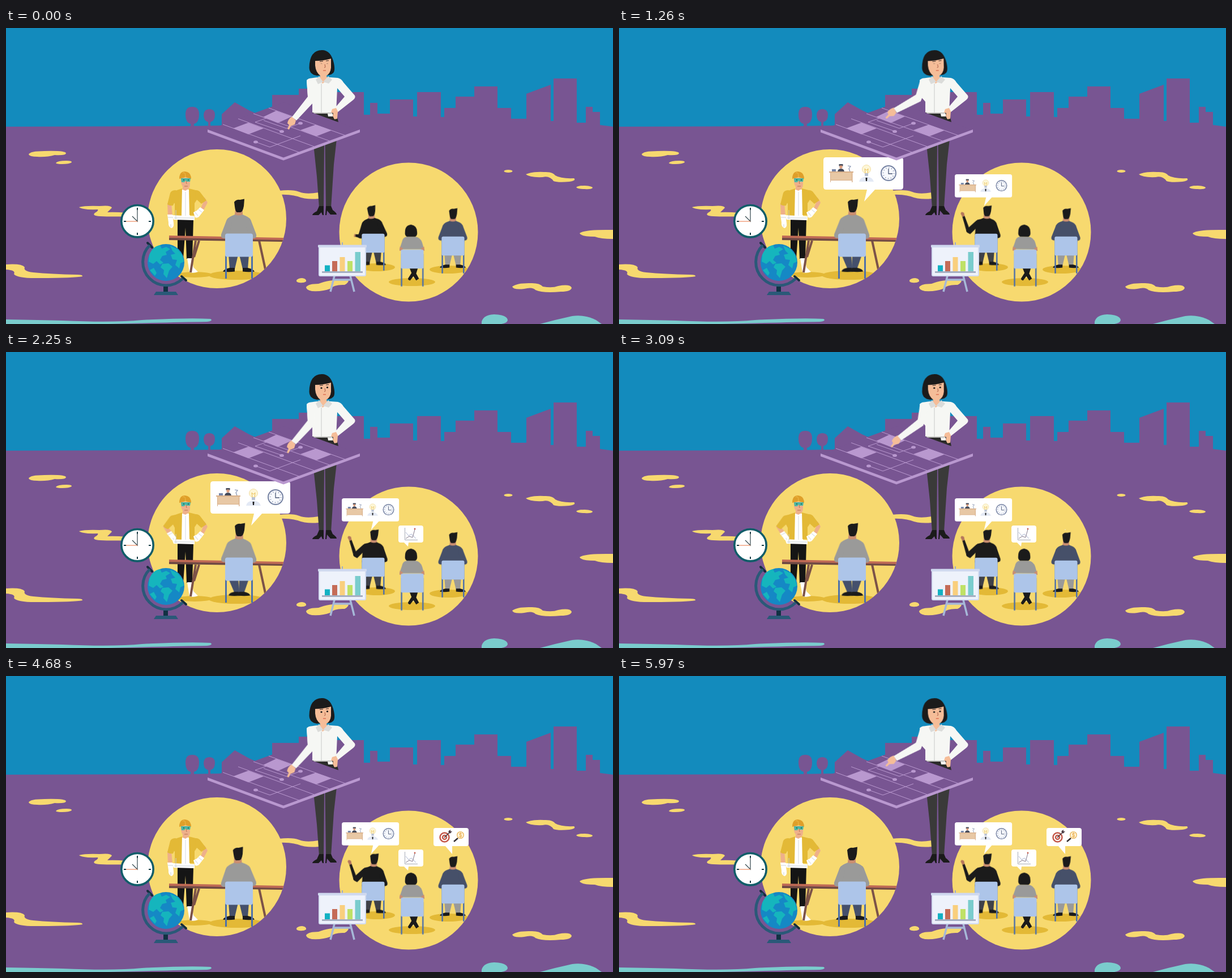
These frames come from a looping animation (1072x522 px, 6 s). An HTML page:

```html
<!DOCTYPE html>
<html lang="en">
<head>
<meta charset="utf-8">
<title>Planning workshop</title>
<style>
html, body { margin: 0; width: 100%; height: 100%; overflow: hidden; background: #785592; }
svg { display: block; width: 100%; height: 100%; }
.ground { fill: #785592; }
.sun { fill: #f7d96f; }
.shade { fill: #e3b936; }
.teal { fill: #7acccd; }
.skin { fill: #f5bd98; }
.ink { fill: #1b1b1b; }
.white { fill: #fff; }
.coat { fill: var(--coat); }
.leg { fill: var(--pants); }
.wire { fill: none; stroke: #b998cf; stroke-width: 1; }
.patch { fill: #b998cf; }

[class*="a-"] { animation: 6s infinite cubic-bezier(.37, 0, .63, 1); }
.a-point { animation-name: point; transform-origin: 538px 96px; }
.a-nod { animation-name: nod; transform-origin: 561px 90px; }
.a-blink { animation-name: blink; animation-timing-function: step-end; transform-origin: 562px 63px; }
.a-wink { animation-name: wink; animation-timing-function: step-end; transform-origin: 318px 268px; }
.a-upper { animation-name: upper; transform-origin: 292px 290px; }
.a-fore { animation-name: fore; transform-origin: 287px 311px; }
.a-lean { animation-name: lean; transform-origin: 411px 372px; }
.a-footL { animation-name: footL; transform-origin: 402px 400px; }
.a-footR { animation-name: footR; transform-origin: 420px 400px; }
.a-turn { animation-name: turn; transform-origin: 411px 372px; }
.a-raise { animation-name: raise; transform-origin: 398px 336px; }
.a-wave { animation-name: wave; transform-origin: 383px 367px; }
.a-sway { animation-name: sway; transform-origin: 411px 372px; }
.a-talk1 { animation-name: talk1; transform-origin: 433px 306px; }
.a-talk2 { animation-name: talk2; transform-origin: 433px 306px; }
.a-talk3 { animation-name: talk3; transform-origin: 710px 343px; }
.a-talk4 { animation-name: talk4; transform-origin: 788px 314px; }

@keyframes point { 0%, 40%, 80% { transform: rotate(0deg); } 20%, 60%, 100% { transform: rotate(21deg); } }
@keyframes nod { 0%, 40%, 80% { transform: rotate(0deg); } 20%, 60%, 100% { transform: rotate(-1deg); } }
@keyframes blink {
  0%, 20%, 40%, 60%, 80% { transform: scaleY(.2); }
  2.3%, 22.3%, 42.3%, 62.3%, 82.3%, 100% { transform: none; }
}
@keyframes wink { 0%, 7.5%, 90.5%, 100% { transform: none; } 5%, 88% { transform: scaleY(.2); } }
@keyframes upper { 0%, 29%, 65%, 100% { transform: rotate(0deg); } 36.5%, 54% { transform: rotate(22deg); } }
@keyframes fore {
  0%, 29%, 65%, 100% { transform: rotate(0deg) scaleY(1); }
  36.5%, 54% { transform: rotate(-50deg) scaleY(.72); }
}
@keyframes lean {
  0%, 100% { transform: rotate(0deg); }
  9%, 63% { transform: rotate(1deg); }
  76%, 82% { transform: rotate(-2deg); }
}
@keyframes footL { 0%, 75%, 100% { transform: skewX(0deg); } 9%, 65% { transform: skewX(19deg); } }
@keyframes footR { 0%, 75%, 100% { transform: skewX(0deg); } 9%, 65% { transform: skewX(-15deg); } }
@keyframes turn { 0% { transform: rotate(-4deg); } 8%, 100% { transform: rotate(2deg); } }
@keyframes raise { 0% { transform: rotate(0deg); } 8%, 100% { transform: rotate(25deg); } }
@keyframes wave { 0% { transform: rotate(-80deg) scaleY(.3); } 8%, 100% { transform: rotate(-46deg); } }
@keyframes sway { 0%, 40%, 80% { transform: none; } 20%, 60%, 100% { transform: rotate(.8deg); } }
@keyframes talk1 { 0%, 14%, 50%, 100% { transform: scale(0); } 19%, 45% { transform: none; } }
@keyframes talk2 { 0%, 7% { transform: scale(0); } 12%, 100% { transform: none; } }
@keyframes talk3 { 0%, 26% { transform: scale(0); } 31%, 100% { transform: none; } }
@keyframes talk4 { 0%, 51% { transform: scale(0); } 56%, 100% { transform: none; } }
</style>
</head>
<body>
<svg viewBox="0 0 1072 522" preserveAspectRatio="none">
<defs>
  <clipPath id="room"><circle cx="372.5" cy="336.5" r="122.5"/></clipPath>
  <clipPath id="hall"><circle cx="711" cy="360" r="122.5"/></clipPath>

  <g id="chair">
    <path d="M388.500 372V442M434.500 372V442" stroke="#4c70ab" stroke-width="3"/>
    <rect x="387" y="362.500" width="49" height="41" rx="3.5" fill="#adc5e9"/>
  </g>
  <g id="trunk">
    <path class="coat" d="M391 338Q394 333 404 329H418Q428 333 431 338L434 346L436 374H387L388 346z"/>
    <path fill="#c98d70" d="M405 318H418V329Q411 332 404 329z"/>
    <path class="ink" d="M403 307Q407 302 413 303L421 301.500L420 314Q418 325 414 325H408Q405 324 404 315z"/>
  </g>
  <path id="sleeve" class="coat" d="M400 331Q390 334 388 343L380 364Q379 370 384 371H391L398 350z"/>
  <path id="shin" class="leg" d="M393 400H410L404 425H395z"/>
  <path id="shoe" class="ink" d="M404 423V429.500Q393 431 383 429.500Q385 425 395 423z"/>
  <g id="legs">
    <use href="#shin"/><use href="#shoe"/>
    <g transform="matrix(-1 0 0 1 822 0)"><use href="#shin"/><use href="#shoe"/></g>
  </g>

  <g id="agenda">
    <path class="white" d="M366 228H497Q502 228 502 233V280Q502 285 497 285H452L433 306L438 285H366Q361 285 361 280V233Q361 228 366 228z"/>
    <path fill="#d9b08a" d="M371 253H414V255H412.500V272H411V269H374V272H373V255H371z"/>
    <path fill="#e8c8a5" d="M374 255H411V268H374z"/>
    <path fill="#464b5a" d="M386 253Q387 248 392 248Q397 248 398 253zM388.500 240H395.500V243.500H388.500z"/>
    <circle cx="392" cy="245" r="2.700" fill="#dc9c7c"/>
    <path fill="#7887a8" d="M376 249H383V253H376z"/>
    <path d="M408 253L406 248L409 244L404 243" fill="none" stroke="#8290ae" stroke-width="1.200"/>
    <path fill="#e3e9f5" d="M424 271Q425 263 437 262Q448 263 450 271z"/>
    <path class="ink" d="M435.500 264H438.500L438 270H436z"/>
    <circle cx="437" cy="249" r="7.500" fill="#fdf6d6" stroke="#f3dfa5"/>
    <path d="M435 256L434 248L437 251L440 248L439 256" fill="none" stroke="#eabf58"/>
    <path fill="#b9c2d3" d="M434 256H440V261H434z"/>
    <circle cx="476" cy="256" r="13" fill="#f7f9fd" stroke="#7582a2" stroke-width="2"/>
    <circle cx="476" cy="256" r="9.500" fill="none" stroke="#7582a2" stroke-width="2" stroke-dasharray="1 3.974"/>
    <path d="M476 248V257H483" fill="none" stroke="#4c5875" stroke-width="1.300"/>
  </g>
</defs>

<rect width="1072" height="522" fill="#138bbd"/>
<g class="ground">
  <path d="M0 174L318 173L381 172V152L404 131L429 145L440 150L470 139V118H517V107H531L560 113H632V153H643V132H656V151H678V126H719V156H726V113H768V157H774V141H794V121H827V103H868V141H892V160H919V116L962 100V164H967V89H1008V167H1024V139H1036V148H1049V171L1072 174V522H0z"/>
  <path d="M317 152Q317 139 329 139Q341 139 341 152Q341 167 332 169V174H326V169Q317 167 317 152zM349 153Q350 143 359 143Q369 143 369 153Q369 164 361 166V174H357V166Q349 164 349 153z"/>
</g>

<g class="sun">
  <path d="M40 223Q42 217 68 217Q106 216 106 221Q105 225 86 224Q72 228 55 227Q42 227 40 223z"/>
  <path d="M88 238Q91 234 107 234Q117 234 116 237Q112 240 99 240Q89 240 88 238z"/>
  <path d="M129 316Q140 313 165 314Q186 312 187 317Q183 321 179 325Q190 324 215 326V332Q190 333 166 332Q151 331 157 326Q164 322 162 320Q135 321 129 316z"/>
  <path d="M0 417Q28 415 33 422Q30 429 48 431Q80 434 126 435Q136 435 135 438Q120 441 60 441Q20 442 14 434Q18 427 0 426z"/>
  <path d="M482 287Q505 284 518 289Q530 294 552 290V301Q530 303 515 297Q500 293 482 294z"/>
  <ellipse cx="887" cy="252.500" rx="7.500" ry="2.500"/>
  <path d="M918 258Q930 253 950 254Q965 253 970 260Q980 266 1003 265Q1008 269 995 271Q975 273 967 270Q960 260 948 263Q925 264 918 258z"/>
  <path d="M1007 281Q1010 278 1022 278Q1037 279 1036 282Q1033 285 1022 284Q1009 284 1007 281z"/>
  <path d="M1072 356Q1020 355 1013 362Q1016 368 1040 368Q1050 372 1072 372z"/>
  <path d="M894 456Q903 449 929 450Q943 450 948 456Q965 459 975 455Q996 451 999 458Q998 465 980 465Q948 468 935 462Q930 456 915 460Q896 462 894 456z"/>
  <path d="M513 445Q516 441 523 441Q531 442 530 447Q526 450 518 449Q512 448 513 445z"/>
  <path d="M530 457Q534 451 552 451Q570 443 604 444Q607 448 598 453Q580 452 572 460Q560 465 540 464Q530 462 530 457z"/>
</g>
<g class="teal">
  <path d="M0 514Q60 515 100 516Q190 520 240 515Q320 511 361 513Q367 516 355 518Q290 519 180 522H0z"/>
  <path d="M840 518Q843 506 862 505Q885 506 886 515Q886 520 875 522H840z"/>
  <path d="M943 522Q972 514 1000 508Q1022 505 1042 515L1052 522z"/>
</g>

<circle class="sun" cx="372.500" cy="336.500" r="122.500"/>
<circle class="sun" cx="711" cy="360" r="122.500"/>

<g class="shade" clip-path="url(#room)">
  <ellipse cx="333" cy="435" rx="31" ry="5"/>
  <ellipse cx="407" cy="436" rx="49" ry="8"/>
</g>
<g class="shade" clip-path="url(#hall)">
  <ellipse cx="655" cy="422" rx="32" ry="7"/>
  <ellipse cx="717" cy="448" rx="41" ry="7"/>
  <ellipse cx="782" cy="426" rx="34" ry="7"/>
</g>

<!-- Builder -->
<g>
  <path fill="#151515" d="M303 338H331L329 407H319L317 352L313 407H303z"/>
  <path class="white" d="M320 406H328L331 422L339 430Q332 433 324 431zM304 406H312V420H303z"/>
  <path class="white" d="M309 285H325V333H307z"/>
  <path fill="#e3b936" d="M311 283L299 287Q292 288 290 294L298 310V331H310zM323 283L335 286Q341 288 343 294L333 309V330H324z"/>
  <path d="M317 289V331" stroke="#d5d9dc"/>
  <path fill="#eeb08a" d="M309 264H325V276Q324 284 320 285L317 287L312 285V279Q308 275 309 264z"/>
  <path fill="#df9f29" d="M306 266Q306 253 316 253Q327 254 327 266L317 263z"/>
  <path d="M312 256Q317 252 317 263" fill="none" stroke="#f0bd4b"/>
  <path fill="#4bb7a2" d="M309 265H326L325 271H319L317 269L315 272H310z"/>
  <path class="a-wink" d="M314 267V269M322 267V269" stroke="#20524d" stroke-width="1.500"/>
  <path d="M318 270L319 275M315 279H321" fill="none" stroke="#b87052"/>
  <path class="white" d="M293 330L333 332V339L296 338z"/>
  <path d="M297 335H332M300 321V337" stroke="#c9d1d5"/>
  <path fill="#eeb08a" d="M344 301L351 299L356 308L349 321L344 318L348 308z"/>
  <path fill="#e3b936" d="M335 286Q341 286 344 291L354 304L345 310L334 300z"/>
  <path class="white" d="M343 316L350 321L343 330Q339 336 334 334L331 325L337 322z"/>
  <path d="M340 320L346 325M334 325L339 331" stroke="#ccd3d6"/>
  <g class="a-upper">
    <g class="a-fore">
      <path fill="#eeb08a" d="M285 309H292L294 332H286z"/>
      <path class="white" d="M285 329H294L296 344Q297 352 292 353Q286 350 287 343z"/>
      <path d="M286 334H295M291 346V351" stroke="#ccd3d6"/>
    </g>
    <path fill="#e3b936" d="M300 286Q292 286 290 291L285 311Q289 314 295 313L301 300z"/>
  </g>
</g>

<!-- Table -->
<g clip-path="url(#room)">
  <path d="M335 375L326 431M341 375L332 404M447 375L459 430" stroke="#7c5348" stroke-width="4"/>
  <path fill="#704a44" d="M288 369L490 372V377L288 374z"/>
  <path fill="#bf6a55" d="M288 366L490 370V374L288 370z"/>
</g>

<!-- Seated listener -->
<g style="--coat:#9a9a99;--pants:#45506c">
  <g class="a-footL"><use href="#shin"/><use href="#shoe"/></g>
  <g class="a-footR"><g transform="matrix(-1 0 0 1 822 0)"><use href="#shin"/><use href="#shoe"/></g></g>
  <g class="a-lean">
    <use href="#trunk"/><use href="#sleeve"/>
    <use href="#sleeve" transform="matrix(-1 0 0 1 822 0)"/>
  </g>
  <use href="#chair"/>
</g>

<!-- Audience -->
<g transform="translate(311 65.400) scale(.82)" style="--coat:#1b1b1b;--pants:#3f4148">
  <use href="#legs"/>
  <g class="a-turn">
    <use href="#trunk"/>
    <use href="#sleeve" transform="matrix(-1 0 0 1 822 0)"/>
    <g class="a-raise">
      <g class="a-wave">
        <path class="coat" d="M380 368L382 333H387L388 366Q384 373 380 368z"/>
        <path fill="#b5775b" d="M382 335L380.500 327Q384 322 388 328L387 335z"/>
      </g>
      <use href="#sleeve"/>
    </g>
  </g>
  <use href="#chair"/>
</g>
<g transform="translate(452 70.400) scale(.82)" style="--coat:#465069;--pants:#9a9a99">
  <use href="#legs"/>
  <g class="a-sway">
    <use href="#trunk"/><use href="#sleeve"/>
    <use href="#sleeve" transform="matrix(-1 0 0 1 822 0)"/>
  </g>
  <use href="#chair"/>
</g>
<g transform="translate(380 93.400) scale(.82)" style="--coat:#9a9a99">
  <path class="ink" d="M404 398H425L420 414L426 425L420 429L414 420L407 429Q401 428 403 424L410 413z"/>
  <g class="a-sway">
    <path class="coat" d="M400 335H418Q429 336 433 348L437 362H384L389 347Q391 336 400 335z"/>
    <path fill="#c98d70" d="M385 356L391 360V365H384zM437 356L431 360V365H438z"/>
    <path class="ink" d="M396 325Q396 310 409 309Q422 311 422 325Q423 333 418 335H400Q395 333 396 325z"/>
  </g>
  <use href="#chair"/>
</g>

<!-- Speech bubbles -->
<g class="a-talk1"><use href="#agenda"/></g>
<g transform="translate(334.200 94.500) scale(.717)"><g class="a-talk2"><use href="#agenda"/></g></g>
<g class="a-talk3">
  <path class="white" d="M697 306H733Q737 306 737 310V332Q737 336 733 336H711L710 343L703 336H697Q693 336 693 332V310Q693 306 697 306z"/>
  <g fill="none">
    <path d="M704.500 310V331.500H727" stroke="#a7abb5"/>
    <path d="M706 318L711 324L716 321L724 329" stroke="#aab4d0"/>
    <path d="M706 329L712 325L718 327L722 313" stroke="#82798c"/>
  </g>
  <circle cx="722" cy="312" r="1.400" fill="#c85f50"/>
</g>
<g class="a-talk4">
  <path class="white" d="M759 268H813Q817 268 817 272V296Q817 300 813 300H788V314L776 300H759Q755 300 755 296V272Q755 268 759 268z"/>
  <g fill="none" stroke="#c4594a" stroke-width="2.500">
    <circle cx="774.500" cy="284.500" r="8"/><circle cx="774.500" cy="284.500" r="3.500"/>
  </g>
  <path d="M774 285L785 274" stroke="#4b3b42" stroke-width="1.600"/>
  <path fill="#4b3b42" d="M781 274L785 271V274H788L784 278z"/>
  <path d="M798 286L791 292" stroke="#332d30" stroke-width="2.500"/>
  <circle cx="802.500" cy="280.500" r="5.800" fill="#fff4da" stroke="#edbd68" stroke-width="1.500"/>
  <text x="802.500" y="284" text-anchor="middle" font-family="Roboto, sans-serif" font-size="9" font-weight="700" fill="#e8a53a">$</text>
</g>

<!-- Wall clock -->
<circle cx="232" cy="340.700" r="28.200" fill="#fff" stroke="#115d69" stroke-width="3.600"/>
<path d="M232 317V321M232 361V365M208 341H212M252 341H256" stroke="#173c45" stroke-width="2"/>
<path d="M232 320V341L223 332" fill="none" stroke="#33474d" stroke-width="1.200"/>
<path d="M212 341H232" stroke="#ee8d62" stroke-width="1.200"/>

<!-- Globe -->
<path d="M250 379L258 387M310 438L318 445" stroke="#152d3c" stroke-width="4" stroke-linecap="round"/>
<path d="M254 383A40 40 0 1 0 312 442" fill="none" stroke="#2a5978" stroke-width="5"/>
<circle cx="282.500" cy="413.500" r="32.500" fill="#1588c5"/>
<path fill="#15b5bd" d="M253 400Q259 385 272 383L275 389L283 386L290 390L282 395L284 400L276 402L272 409L278 414L272 417L266 411L260 416L252 412zM276 416L287 415L294 421L288 428L284 441L278 434L279 427L273 422zM290 384L303 390L311 400L314 412L308 415L306 424L299 418L302 409L294 408L291 400L299 398L294 393zM254 427L261 423L266 432L263 437z"/>
<path fill="#123143" d="M278 456H286V467H278z"/>
<path fill="#2a5978" d="M265 465H300L304 471H261z"/>

<!-- Flip chart -->
<path d="M580 437L573 465M608 437L615 465M578 444H611" fill="none" stroke="#a6b8d8" stroke-width="3.500"/>
<path d="M594 378V384" stroke="#9eabc8" stroke-width="2"/>
<rect x="553" y="385" width="82" height="52" rx="2" fill="#eef2fb" stroke="#d3dcf0" stroke-width="2"/>
<rect x="551" y="382.500" width="86" height="4.500" rx="1" fill="#d0d9ef"/>
<rect x="558" y="429" width="72" height="3" fill="#a5aec2"/>
<path fill="#12b1c3" d="M563 418.500H572V429H563z"/>
<path fill="#c56b57" d="M576 411H585V429H576z"/>
<path fill="#f9cf7d" d="M589.500 404H598.500V429H589.500z"/>
<path fill="#bfe166" d="M603 411H612V429H603z"/>
<path fill="#7acccd" d="M616.500 395H626V429H616.500z"/>

<!-- Planner -->
<path fill="#3a3a39" d="M543 205H562L561 317H553L549 262zM563.500 205L584 196L579 240L574 317H565z"/>
<path class="ink" d="M553 314H561V330H559L557 325L552 330H541Q541 327 549 323zM565 314H574L577 321Q584 326 584 329H573L567 322L566 330H564z"/>
<path fill="#2b2b2a" d="M541 148H583L587 166L541 156z"/>
<path d="M543 150H576" stroke="#f4f4f0" stroke-width="1.500"/>
<path fill="#f4f4f0" d="M568 151H577V156H569z"/>
<path fill="#f6f7f4" d="M531 92Q534 88 552 87H572L586 88Q592 89 596 96L616 119Q618 123 613 127L585 149L580 142L598 121L585 106L583 149H541V130L533 121z"/>
<path d="M557 98V149" stroke="#c9cac8"/>
<path class="skin" d="M576 143L583 141L586 147L585 160L580 161L577 155L578 150L574 149z"/>

<path fill="#785592" d="M356 180L491 131L625 180L490 229z"/>
<path class="patch" d="M356 179L490 228.500L625 179V184L490 233.500L356 184z"/>
<path class="patch" d="M401 177L428 167L455 177L428 187.500zM454 157L477 146L505 156L480 167.500zM520 180L547 170.500L575 180.500L548 191z"/>
<path class="wire" d="M383 170L517 219M410 160L544 209M437 151L571 199M464 141L598 189M441 201L466 210L520 190M487 182L440 166L460 159M520 168L495 177L455 163"/>
<g class="patch">
  <ellipse cx="441" cy="201" rx="4" ry="2.500"/><ellipse cx="487" cy="182.500" rx="4" ry="2.500"/><ellipse cx="520" cy="168" rx="4" ry="2.500"/>
</g>

<g class="a-nod">
  <path class="ink" d="M535.500 70Q536 39 558 39Q574 39 579 62Q582 77 577 80Q574 83 570 83L549 84Q536 82 535.500 70z"/>
  <path class="skin" d="M546 58Q560 58 574 54V70Q573 80 566 84L568 92L559 98L553 91L555 84Q547 78 546 66z"/>
  <path d="M554 59L560 58.500M565 58L570 57.500" stroke="#312723"/>
  <g class="a-blink ink"><circle cx="557" cy="63.500" r="1.600"/><circle cx="567.500" cy="62.500" r="1.600"/></g>
  <path d="M563 64L564 69L562 70" fill="none" stroke="#a95c47"/>
  <path d="M560 75H565" stroke="#dd6d51" stroke-width="1.400"/>
</g>
<path fill="#dbdcda" d="M547 91L553 85L560 95L551 99zM560 95L569 85L576 91L570 98z"/>

<g class="a-point">
  <path class="skin" d="M505 156L512 163L510 170L503 173L500 179L497 178L500 171L497 168Q498 161 505 156z"/>
  <path fill="#f6f7f4" d="M531 94Q533 88 540 89L546 96L545 129L513 163L505 157L533 121z"/>
</g>
</svg>
</body>
</html>
```
